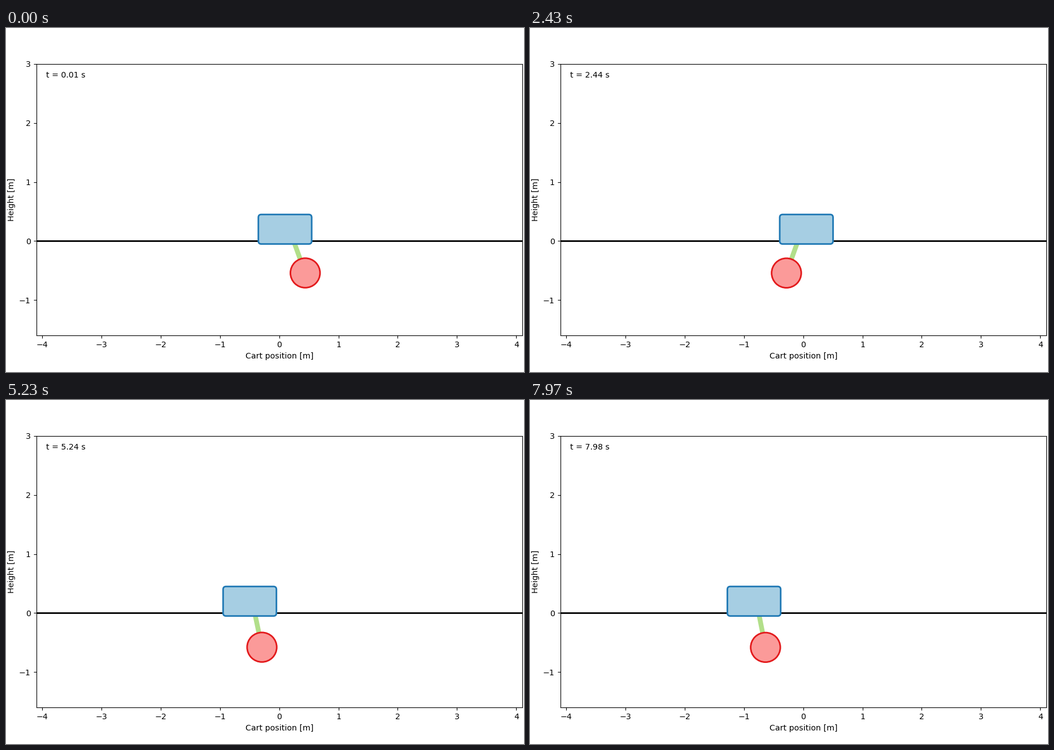
Animation of 917x611 px, one loop 8.01 s. Source, as a matplotlib script:

```python
import numpy as np
import matplotlib.pyplot as plt
from matplotlib.animation import FuncAnimation
from matplotlib.patches import Circle, FancyBboxPatch

WIDTH, HEIGHT, DPI = 917, 611, 102
FPS, STEPS = 30, 240           # simulated poses
TICK_MS, LOOP_MS = 30, 8010    # screen refresh
LEAD_MS = 24                   # keeps each refresh in step with the poses

GRAVITY = 9.81
MASS_RATIO = 0.3777            # bob mass / total mass
LENGTH = 1.0
PIVOT_Y = 0.4
CART_W, CART_H, PAD = 0.8, 0.4, 0.05
X0, DRIFT = 0.0977, -0.1235    # cart start, speed of the centre of mass
ANGLE0, SPIN0 = 0.348, 0.485

BLUE, DARK_BLUE = "#a6cee3", "#1f78b4"
RED, DARK_RED = "#fb9a99", "#e31a1c"
GREEN = "#b2df8a"


def derivative(state):
    angle, spin = state
    s, c = np.sin(angle), np.cos(angle)
    accel = -(MASS_RATIO * s * c * spin**2 + GRAVITY / LENGTH * s)
    return np.array([spin, accel / (1 - MASS_RATIO * c**2)])


def rk4(state, dt):
    k1 = derivative(state)
    k2 = derivative(state + dt / 2 * k1)
    k3 = derivative(state + dt / 2 * k2)
    k4 = derivative(state + dt * k3)
    return state + dt / 6 * (k1 + 2 * k2 + 2 * k3 + k4)


def simulate(substeps=4):
    """Pendulum angle and cart position for every step."""
    state = np.array([ANGLE0, SPIN0])
    angles = np.empty(STEPS)
    for i in range(STEPS):
        angles[i] = state[0]
        for _ in range(substeps):
            state = rk4(state, 1 / (FPS * substeps))
    # No outside force: the centre of mass drifts at constant speed.
    swing = MASS_RATIO * LENGTH * (np.sin(ANGLE0) - np.sin(angles))
    return angles, X0 + DRIFT * np.arange(STEPS) / FPS + swing


angles, carts = simulate()

fig = plt.figure(figsize=(WIDTH / DPI, HEIGHT / DPI), dpi=DPI)
scale = 104.9                  # pixels per metre
ax = fig.add_axes([53.6 / WIDTH, 64.75 / HEIGHT,
                   8.2 * scale / WIDTH, 4.6 * scale / HEIGHT])
ax.set(xlim=(-4.1, 4.1), ylim=(-1.6, 3),
       xlabel="Cart position [m]", ylabel="Height [m]")
ax.set_yticks(range(-1, 4))

ax.axhline(0, color="black", lw=2, zorder=1)
rod, = ax.plot([], [], color=GREEN, lw=6, zorder=2)
cart = FancyBboxPatch((0, 0), CART_W, CART_H,
                      boxstyle=f"round,pad={PAD}",
                      fc=BLUE, ec=DARK_BLUE, lw=2, zorder=3)
bob = Circle((0, 0), 0.25, fc=RED, ec=DARK_RED, lw=2, zorder=4)
ax.add_patch(cart)
ax.add_patch(bob)
clock = ax.text(0.02, 0.95, "", transform=ax.transAxes)


def update(tick):
    step = min(int((tick * TICK_MS + LEAD_MS) * FPS / 1000), STEPS - 1)
    x, angle = carts[step], angles[step]
    tip = (x + LENGTH * np.sin(angle), PIVOT_Y - LENGTH * np.cos(angle))
    cart.set_x(x - CART_W / 2)
    rod.set_data([x, tip[0]], [PIVOT_Y, tip[1]])
    bob.center = tip
    clock.set_text(f"t = {step / FPS + 0.01:.2f} s")
    return cart, rod, bob, clock


anim = FuncAnimation(fig, update, frames=LOOP_MS // TICK_MS,
                     interval=TICK_MS, repeat=True, repeat_delay=0)
plt.show()
```
